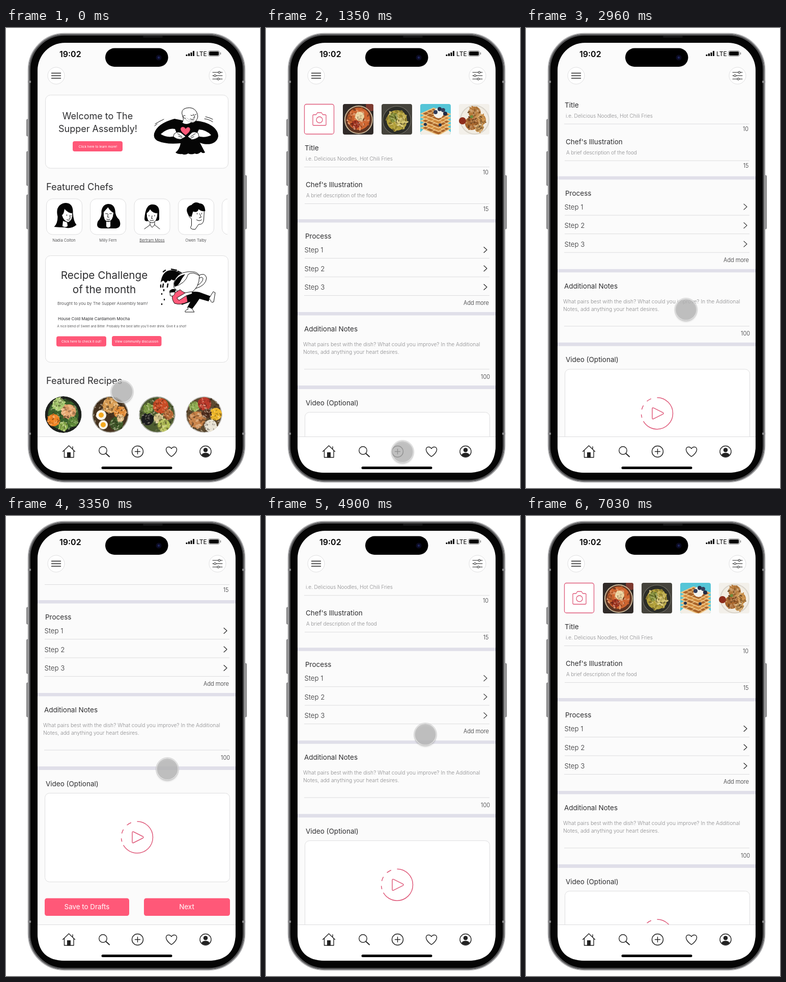
These frames come from a looping animation (499 px wide and 902 px high, 8020 ms). An HTML page:

```html
<!DOCTYPE html>
<html lang="en">
<head>
<meta charset="utf-8">
<title>Recipe app walkthrough</title>
<style>
html, body { margin: 0; width: 100%; height: 100%; overflow: hidden; background: #fff; }
#stage { display: block; width: 100%; height: 100%; }
text { font-family: Inter, "Open Sans", sans-serif; fill: #2d2d2f; }
.mid { text-anchor: middle; }
.end { text-anchor: end; }
.h1 { font-size: 18.2px; }
.h2 { font-size: 20.7px; }
.label { font-size: 13.5px; }
.step { font-size: 13.3px; font-weight: 300; }
.hint { font-size: 10px; font-weight: 300; fill: #8b8b8d; }
.count { font-size: 11px; font-weight: 300; }
.name { font-size: 7.6px; font-weight: 300; text-anchor: middle; }
.tiny { font-size: 6.5px; fill: #fff; text-anchor: middle; }
.cta { font-size: 13.4px; fill: #fff; text-anchor: middle; }
.card { fill: #fff; stroke: #dededf; }
.rule { stroke: #dcdcde; fill: none; }
.band { fill: #e0dfe9; }
.pink { fill: #ff5878; }
.line { fill: none; stroke: #222; stroke-width: 1.4; stroke-linecap: round; stroke-linejoin: round; }
.thin { stroke-width: 1.1; }
.ink { fill: #050505; }
.skin { fill: #fff; stroke: #111; stroke-width: 1; stroke-linejoin: round; stroke-linecap: round; }
.pen { fill: none; stroke: #111; stroke-linecap: round; }
.accent { fill: none; stroke: #df5b7b; stroke-width: 1.5; stroke-linejoin: round; stroke-linecap: round; }

#home, #compose, #scroller, #cursor { animation: 8020ms linear infinite; }
#home { animation-name: leave; animation-timing-function: step-end; }
#compose { animation-name: enter; animation-timing-function: step-end; }
#scroller { animation-name: scroll; }
#cursor { animation-name: travel; }
@keyframes leave { 0% { visibility: visible; } 12.84%, 100% { visibility: hidden; } }
@keyframes enter { 0% { visibility: hidden; } 12.84%, 100% { visibility: visible; } }
@keyframes scroll {
  0%, 34.04% { transform: translateY(0); }
  38.65% { transform: translateY(-135px); animation-timing-function: ease-out; }
  41.15%, 54% { transform: translateY(-210px); }
  61.1% { transform: translateY(-117px); }
  66.5%, 100% { transform: translateY(-18px); }
}
@keyframes travel {
  0%, 1.12% { transform: translate(228px, 713px); }
  3.74% { transform: translate(213px, 728px); }
  6% { transform: translate(209px, 765px); }
  8.73% { transform: translate(232px, 822px); }
  10.97%, 12.84% { transform: translate(258px, 844px); }
  16.83% { transform: translate(268px, 831px); }
  22.44%, 23.57% { transform: translate(324px, 750px); }
  28.18% { transform: translate(318px, 653px); }
  33.04%, 34.04% { transform: translate(311px, 620px); }
  39.28%, 43.64% { transform: translate(317px, 496px); }
  53%, 54% { transform: translate(311px, 335px); }
  61.1% { transform: translate(313px, 428px); }
  66.5% { transform: translate(300px, 527px); }
  70.7% { transform: translate(225px, 794px); }
  74.56%, 82.79% { transform: translate(261px, 834px); }
  87.65% { transform: translate(129px, 922px); opacity: 1; }
  87.66%, 100% { transform: translate(129px, 926px); opacity: 0; }
}
</style>
</head>
<body>
<svg id="stage" viewBox="0 0 499 902">
<defs>
  <clipPath id="view"><rect x="62" y="130" width="389" height="672"/></clipPath>
  <clipPath id="row"><rect x="62" y="330" width="373" height="80"/></clipPath>
  <clipPath id="tile"><rect width="60" height="60" rx="4"/></clipPath>
  <clipPath id="bowl"><circle r="36"/></clipPath>
  <filter id="soft" x="-30%" y="-30%" width="160%" height="170%"><feGaussianBlur stdDeviation="1.6"/></filter>
  <path id="chevron" class="line thin" d="M0-5.500 6 0 0 5.500"/>
  <rect id="chef" class="card" width="70" height="70" rx="12"/>
</defs>

<g id="phone">
  <g fill="#8c8c8e" stroke="#5c5c5e" stroke-width=".7">
    <rect x="40.500" y="179" width="5" height="33" rx="1.500"/>
    <rect x="40.500" y="242" width="5" height="67" rx="1.500"/>
    <rect x="40.500" y="327" width="5" height="67" rx="1.500"/>
    <rect x="467.500" y="289" width="5" height="105" rx="1.500"/>
  </g>
  <rect x="44" y="11" width="425" height="879" rx="71" fill="#050505" stroke="#a3a3a5" stroke-width="2.500"/>
  <rect x="46.500" y="13.500" width="420" height="874" rx="68.500" fill="none" stroke="#58585a" stroke-width="2.500"/>
  <path d="M43 105.500h6M464 105.500h6M43 795.500h6M464 795.500h6" stroke="#8a8a8c" stroke-width="4"/>
  <rect x="269" y="15" width="39" height="4" rx="2" fill="#171718"/>
  <rect x="62" y="29" width="389" height="843" rx="54" fill="#fbfbfb"/>
</g>

<g id="home">
  <rect class="card" x="77.500" y="131.500" width="359" height="143.500" rx="10"/>
  <text class="h1 mid" x="180" y="179" style="font-size:18px">Welcome to The</text>
  <text class="h1 mid" x="180.500" y="203.500" style="font-size:18px">Supper Assembly!</text>
  <rect class="pink" x="131" y="222" width="98" height="20" rx="4"/>
  <text class="tiny" x="180.500" y="234.500">Click here to learn more!</text>

  <g id="hug">
    <path class="ink" d="M346 181Q356 188 368 182C390 181 417 193 417 212 415 228 396 231 381 225L391 244Q387 247 383 243 376 249 371 246 364 249 358 246 351 250 346 247 338 248 333 244 341 238 343 226 315 229 297 221 289 216 291 207 297 187 331 178 346 181Z"/>
    <path fill="#fff" d="M304 208Q318 195 332 198L337 211Q317 217 304 208ZM379 199Q394 200 403 210 390 217 373 211Z"/>
    <path class="skin" d="M331 207Q339 201 346 207L353 213 344 218Q335 219 329 213ZM377 206Q368 201 363 207L357 213 365 219Q374 218 379 213Z"/>
    <path class="pen" d="M337 207l9 6M339 212l7 3M372 207l-9 6M369 213l-6 3"/>
    <path class="pink" d="M353 210C341 202 341 195 347 194Q351 194 353 198 356 193 360 195C364 199 361 204 353 210Z"/>
    <path class="skin" d="M346 186Q350 180 347 173 342 160 354 157 368 154 374 164 380 175 373 182 368 187 364 185 355 192 346 186Z"/>
    <path class="pen" d="M363 171q2 2 4 0M371 170q2 1 3-1M368 169l3 6-3 1M362 178q4 3 8 0M352 172q-4-2-4 2 1 4 5 3"/>
    <path class="pen" stroke-dasharray=".1 2.500" d="M353 179q6 7 18 3M356 177q5 5 12 4"/>
    <path class="pen" d="M293 188l9-5M292 192l5-4M302 183l8-4M390 178q9 1 16 6M392 174q9 2 14 5"/>
  </g>

  <text class="h1" x="79" y="318">Featured Chefs</text>
  <g clip-path="url(#row)">
    <use href="#chef" x="79.500" y="335"/><use href="#chef" x="165.500" y="335"/><use href="#chef" x="252" y="335"/>
    <use href="#chef" x="338.500" y="335"/><use href="#chef" x="424.500" y="335"/>
  </g>
  <g transform="translate(79.500 335)">
    <path class="ink" d="M32 9C47 5 53 15 52 28Q53 44 59 51 48 60 36 56 25 56 15 55 22 48 22 35 17 15 32 9Z"/>
    <path class="skin" d="M35 19Q34 30 30 32 34 45 43 46 52 42 51 28 43 28 35 19ZM32 43l-1 11q8 4 11-1l-1-7Z"/>
    <path class="pen" d="M40 31v2M48 32v2M45 32l2 6-3 1M40 41q3 2 6 0"/>
  </g>
  <g transform="translate(165.500 335)">
    <path class="ink" d="M35 10Q47 10 49 23 49 34 57 41 63 56 50 58H22Q10 57 15 44 23 36 22 24 24 11 35 10Z"/>
    <path class="skin" d="M35 16Q28 24 26 26 25 44 35 45 45 44 46 27 39 24 35 16ZM31 44v10q4 6 9 0V44Z"/>
    <path class="pen" d="M30 29h4M38 29h4M35 30l-1 6h3M32 40q4 2 7 0"/>
  </g>
  <g transform="translate(252 335)">
    <path class="skin" d="M31 41v10L20 59M40 41v10L50 59M31 51l4 5 5-5"/>
    <path class="ink" d="M34 11Q50 10 49 28V40Q48 44 40 43H29Q20 46 20 39 22 12 34 11Z"/>
    <path class="skin" d="M31 20Q28 26 24 28 24 46 35 47 45 46 46 28 36 28 31 20Z"/>
    <path class="pen" d="M29 32v2M40 32v2M35 33l-1 6h2M31 42q4 2 7 0"/>
  </g>
  <g transform="translate(338.500 335)">
    <path class="skin" d="M23 26Q18 28 22 36L26 39V52Q20 60 33 60L40 50Q49 51 50 41L51 23Q42 16 27 20Z"/>
    <path class="ink" d="M17 25Q15 15 26 12 33 4 42 9 52 9 53 24 43 25 40 20 38 28 29 25L26 35Q20 36 17 25Z"/>
    <path class="pen" d="M37 28v2M46 28v2M42 29l3 7-4 1M36 41q5 4 10 0M22 30q4 0 3 5"/>
  </g>
  <text class="name" x="114" y="418.500">Nadia Colton</text>
  <text class="name" x="200.500" y="418.500">Milly Fern</text>
  <text class="name" x="287" y="418.500" text-decoration="underline">Bertram Moss</text>
  <text class="name" x="373" y="418.500">Owen Talby</text>

  <rect class="card" x="77.500" y="446.500" width="359" height="209" rx="10"/>
  <text class="h2 mid" x="193" y="492">Recipe Challenge</text>
  <text class="h2 mid" x="193" y="520">of the month</text>
  <text x="101" y="543" font-size="8.200" font-weight="300">Brought to you by The Supper Assembly team!</text>
  <text x="102" y="573" font-size="8">House Cold Maple Cardamom Mocha</text>
  <text x="100.500" y="586.500" font-size="6.300" font-weight="300">A nice blend of Sweet and Bitter. Probably the best latte you'll ever drink. Give it a shot!</text>
  <rect class="pink" x="99" y="604.500" width="98" height="20" rx="4"/>
  <text class="tiny" x="148" y="617">Click here to check it out!</text>
  <rect class="pink" x="208" y="604" width="97.500" height="20" rx="4"/>
  <text class="tiny" x="256.500" y="616.500">View community discussion</text>

  <g id="spill">
    <path class="ink" d="M346 484Q333 472 318 476 306 481 304 499 309 493 311 497 313 503 318 495 321 499 325 493 330 497 334 492Z"/>
    <path class="pen" stroke-width="2.500" d="M304 504v4M309 502l-1 6M310 513v2M318 502l-1 6M306 521v1M311 532v1M306 541v1M313 475l-4 3M325 473l10 2M338 477l6 3"/>
    <path class="skin" d="M377 486Q391 478 394 490 393 505 372 511L375 505Q387 499 387 491 385 486 378 492Z"/>
    <path class="skin" d="M330 499Q335 480 357 478 376 476 380 486 380 510 362 520 340 524 330 509Z"/>
    <path class="ink" d="M330 501Q336 485 352 483 345 491 341 500 335 508 331 506Z"/>
    <path class="pen" d="M331 507Q352 502 358 483 366 477 379 485"/>
    <path class="ink" d="M345 526Q362 514 380 518L402 526 398 536 380 531 374 540 365 552 356 548 362 537 345 543Z"/>
    <path class="skin" d="M399 530l8-13 4 2-3 18q-5 3-6-3ZM358 547l7 3 5 7h-18q-1-4 5-5Z"/>
    <path class="pink" stroke="#111" d="M327 522L342 513Q347 518 354 520L357 537Q343 544 331 540Q325 532 327 522Z"/>
    <path class="skin" d="M322 515q9-4 10 4-2 9-9 6ZM336 529l17-10 12-2 1 4-12 4-14 9Z"/>
    <path class="ink" d="M321 519q2-10 13-6l-2 5Z"/>
  </g>

  <text class="h1" x="79" y="698">Featured Recipes</text>
  <g id="bowls"></g>
</g>

<g id="compose" clip-path="url(#view)">
  <g id="scroller">
    <rect x="75.500" y="149.500" width="58" height="58.500" rx="4" fill="#fff" stroke="#df5b7b" stroke-width="1.300"/>
    <path class="accent" style="stroke-width:1.3" d="M94 170h4.500l2.500-4h8l2.500 4h4.500q2 0 2 2v17q0 2-2 2H94q-2 0-2-2v-17q0-2 2-2Z"/>
    <circle class="accent" style="stroke-width:1.3" cx="105" cy="180" r="6"/>
    <g id="tiles"></g>
    <text class="label" x="76" y="240">Title</text>
    <text class="hint" x="78" y="260">i.e. Delicious Noodles, Hot Chili Fries</text>
    <text class="count end" x="437" y="286.500">10</text>
    <text class="label" x="78" y="312">Chef's Illustration</text>
    <text class="hint" x="79" y="332">A brief description of the food</text>
    <text class="count end" x="437.500" y="358.500">15</text>
    <path class="rule" d="M75 272.500H439M76 344.500H439M76 451.500H439M76 488H439M75 524.500H439M75 669H439"/>
    <path class="band" d="M62 375h389v6.500H62ZM62 557h389v6.500H62ZM62 701h389v7H62Z"/>
    <text class="label" x="77" y="413">Process</text>
    <text class="step" x="75.500" y="440">Step 1</text>
    <text class="step" x="75.500" y="476.500">Step 2</text>
    <text class="step" x="75.500" y="513">Step 3</text>
    <use href="#chevron" x="428" y="435"/><use href="#chevron" x="428" y="471.500"/><use href="#chevron" x="428" y="508"/>
    <text class="count end" x="438" y="543">Add more</text>
    <text class="label" x="75" y="595">Additional Notes</text>
    <text class="hint" x="73" y="624" style="font-size:10.3px">What pairs best with the dish? What could you improve? In the Additional</text>
    <text class="hint" x="73" y="639" style="font-size:10.3px">Notes, add anything your heart desires.</text>
    <text class="count end" x="440" y="687.500">100</text>
    <text class="label" x="78" y="739.500">Video (Optional)</text>
    <rect class="card" x="76.500" y="753.500" width="363" height="174" rx="9"/>
    <circle class="accent" r="31" pathLength="360" stroke-dasharray="240 14 12 18 16 20 18 22" transform="translate(257.500 840) rotate(-90)" style="stroke-linecap:butt"/>
    <path class="accent" d="M248 831q0-3 3-1.500l18 9q2 1.500 0 3l-18 9q-3 1.500-3-1.500Z"/>
    <rect class="pink" x="76" y="959.500" width="166" height="34.500" rx="4.500"/>
    <rect class="pink" x="271" y="959.500" width="169" height="34.500" rx="4.500"/>
    <text class="cta" x="159" y="981">Save to Drafts</text>
    <text class="cta" x="355" y="981">Next</text>
  </g>
</g>

<g id="chrome">
  <text x="105" y="57" font-size="16" font-weight="600" style="fill:#000">19:02</text>
  <rect x="195" y="39.500" width="123.500" height="36.500" rx="18.200"/>
  <circle cx="300" cy="58" r="5.500" fill="#0b0b22"/><circle cx="300" cy="58" r="2.200" fill="#20265c"/>
  <path d="M355 55v-3M359.500 55v-5M364 55v-7M368.500 55v-10" stroke="#000" stroke-width="3"/>
  <text x="374" y="55" font-size="12" style="fill:#000">LTE</text>
  <rect x="397.500" y="44.500" width="22" height="11" rx="3.500" fill="#fff" stroke="#888"/>
  <rect x="399" y="46" width="19" height="8" rx="2"/><path d="M421.500 48v4" stroke="#888" stroke-width="1.500"/>
  <g class="card"><circle cx="98.500" cy="93.500" r="16.500"/><circle cx="415.500" cy="93.500" r="16.500"/></g>
  <path class="line" d="M89.500 88.500h18M89.500 93.500h18M89.500 98.500h18"/>
  <path class="line thin" d="M406 87h19M406 93.500h19M406 100h19"/>
  <g fill="#fff" stroke="#222"><circle cx="419" cy="87" r="2"/><circle cx="410.500" cy="93.500" r="2"/><circle cx="417" cy="100" r="2"/></g>
  <path d="M62 801.500H451V818Q451 872 397 872H116Q62 872 62 818Z" fill="#fff"/>
  <path class="rule" d="M62 801.500H451"/>
  <path class="line" d="M111.500 830.500L123.500 819 135.500 830.500M114.500 828v14h18.500v-14M131 821v4"/>
  <rect x="120" y="832" width="7" height="10.500" fill="#222"/>
  <circle class="line" cx="190.500" cy="828.500" r="7.700"/><path class="line" style="stroke-width:2" d="M196.500 834.500l6.500 6"/>
  <circle class="line" cx="258.500" cy="830.500" r="11"/><path class="line" d="M253.500 830.500h10M258.500 825.500v10"/>
  <path class="line" d="M325 840.500C311 831 313 821.500 319.500 821.500Q323 821.500 325 825 327 821.500 330.500 821.500C337 821.500 339 831 325 840.500Z"/>
  <circle class="line" cx="392" cy="830.500" r="11"/>
  <g fill="#222"><circle cx="392" cy="827.500" r="4.300"/><path d="M384 838q1-5 8-5t8 5q-8 6-16 0Z"/></g>
  <rect x="187.500" y="860" width="139" height="5" rx="2.500"/>
</g>

<g id="cursor">
  <circle cy="3" r="21.500" fill="#000" opacity=".16" filter="url(#soft)"/>
  <circle r="21.300" fill="#b8b8b8" fill-opacity=".76" stroke="#f2f2f2" stroke-width="1.200"/>
  <circle r="22.200" fill="none" stroke="#aaa" stroke-width=".6"/>
</g>
</svg>
<script>
const SVG = "http://www.w3.org/2000/svg";
let seed = 7;
const random = () => (seed = seed * 16807 % 2147483647) / 2147483647;

function add(parent, tag, attrs) {
  const node = document.createElementNS(SVG, tag);
  for (const key in attrs) node.setAttribute(key, attrs[key]);
  return parent.appendChild(node);
}

// Each heap: colour, centre x, centre y, spread, piece size.
function plate(parent, x, y, clip, heaps) {
  const group = add(parent, "g", { transform: `translate(${x} ${y})`, "clip-path": `url(#${clip})` });
  for (const [fill, cx, cy, spread, size] of heaps) {
    add(group, "circle", { cx, cy, r: spread, fill });
    if (!size) continue;
    for (let i = 0; i < spread * 3; i++) {
      const angle = random() * 6.283, far = spread * Math.sqrt(random());
      const px = cx + far * Math.cos(angle), py = cy + far * Math.sin(angle);
      add(group, "ellipse", {
        cx: px, cy: py, rx: size, ry: size * .5,
        transform: `rotate(${random() * 180} ${px} ${py})`,
        fill: `color-mix(in srgb, ${fill}, ${i % 2 ? "#fff3d8" : "#1a120c"} ${Math.round(random() * 50)}%)`
      });
    }
  }
}

const bowls = document.getElementById("bowls");
plate(bowls, 112.5, 758, "bowl", [
  ["#1d211d", 0, 0, 36], ["#38602a", 0, 0, 30, 2.5], ["#a4c96c", -9, -20, 12, 3.5],
  ["#f08323", -19, 11, 12, 2.5], ["#e5a36b", 11, -6, 14, 3.5], ["#5d8a38", 19, 14, 10, 2.5], ["#91b850", 0, 23, 9, 2.5]]);
plate(bowls, 205, 758, "bowl", [
  ["#a9a69e", 0, 0, 36], ["#46331f", 0, 0, 34, 2.5], ["#d99d53", 0, -18, 15, 3], ["#e38b35", 19, -4, 12, 2.5],
  ["#3f5a29", 12, 18, 13, 2.5], ["#e9c58f", 20, 7, 7, 2.5],
  ["#faf5e9", -18, 1, 10], ["#f4aa22", -18, 1, 5], ["#faf5e9", -14, 20, 9], ["#f4aa22", -14, 20, 5]]);
plate(bowls, 297, 758, "bowl", [
  ["#b3b5af", 0, 0, 36], ["#4c5b30", 0, 0, 34, 2.5], ["#c94c25", 7, -17, 15, 2.5], ["#1b1c1e", -19, 9, 12, 2.5],
  ["#7d9c42", -18, -12, 10, 2.5], ["#d8c98e", 2, 7, 9, 2.5], ["#b2bf55", 13, 21, 12, 3.5], ["#b96b37", 22, 0, 10, 2.5]]);
plate(bowls, 389, 758, "bowl", [
  ["#c8c6c2", 0, 0, 36], ["#5d4a30", 0, 0, 34, 2.5], ["#8fae52", -19, -16, 10, 2.5], ["#bd3a2c", 1, -21, 13, 2.5],
  ["#efb829", 23, -1, 12, 2], ["#c98248", -14, 10, 16, 3.5], ["#e8e3d6", 13, 22, 12, 2], ["#54301f", 5, -2, 9, 2.5]]);

const tiles = document.getElementById("tiles");
plate(tiles, 151, 149, "tile", [
  ["#302a28", 30, 30, 50], ["#7e3a30", 55, 4, 10], ["#c8b596", 31, 31, 28], ["#5e3321", 31, 31, 26],
  ["#cf6530", 31, 29, 22, 3], ["#ead09c", 33, 24, 9, 2], ["#a33420", 25, 40, 8, 2.5]]);
plate(tiles, 227, 149, "tile", [
  ["#45433c", 30, 30, 50], ["#77756a", 30, 32, 28], ["#2c2d28", 30, 32, 27], ["#b4a23a", 30, 32, 20, 3.5],
  ["#7f8c32", 24, 27, 8, 3], ["#d0c065", 37, 36, 8, 3]]);
plate(tiles, 303, 149, "tile", [["#55c5d7", 30, 30, 50], ["#f3eee5", 30, 82, 40]]);
const waffles = add(tiles, "g", { transform: "translate(303 149)", "clip-path": "url(#tile)" });
for (let i = 0; i < 5; i++) {
  const y = 50 - i * 7;
  add(waffles, "path", { d: `M2 ${y - 3}L26 ${y - 14} 59 ${y - 2} 36 ${y + 11}Z`, fill: i % 2 ? "#d0893c" : "#a9642a", stroke: "#efc686", "stroke-width": 2 });
  add(waffles, "path", { d: `M11 ${y}l24-12M21 ${y + 5}l24-12M12 ${y - 7}l32 13M20 ${y - 11}l32 13`, stroke: "#efc686", "stroke-width": 1.2 });
}
plate(waffles, 0, 0, "tile", [
  ["#f4f2ea", 36, 18, 10], ["#27334e", 38, 10, 4], ["#35415d", 45, 12, 4], ["#202b45", 49, 19, 4],
  ["#303c59", 30, 16, 4], ["#27334e", 39, 41, 3], ["#27334e", 10, 40, 3]]);
plate(tiles, 379, 149, "tile", [
  ["#f3f0ea", 30, 30, 50], ["#d9d4ca", 31, 31, 29], ["#f1ece2", 31, 31, 27], ["#b77a3b", 31, 17, 12, 3],
  ["#c78b45", 42, 31, 11, 3], ["#a9672e", 25, 38, 13, 3], ["#ca9654", 40, 47, 8, 3], ["#8e2d1c", 7, 33, 7], ["#6d8b3d", 25, 25, 3]]);
</script>
</body>
</html>
```
